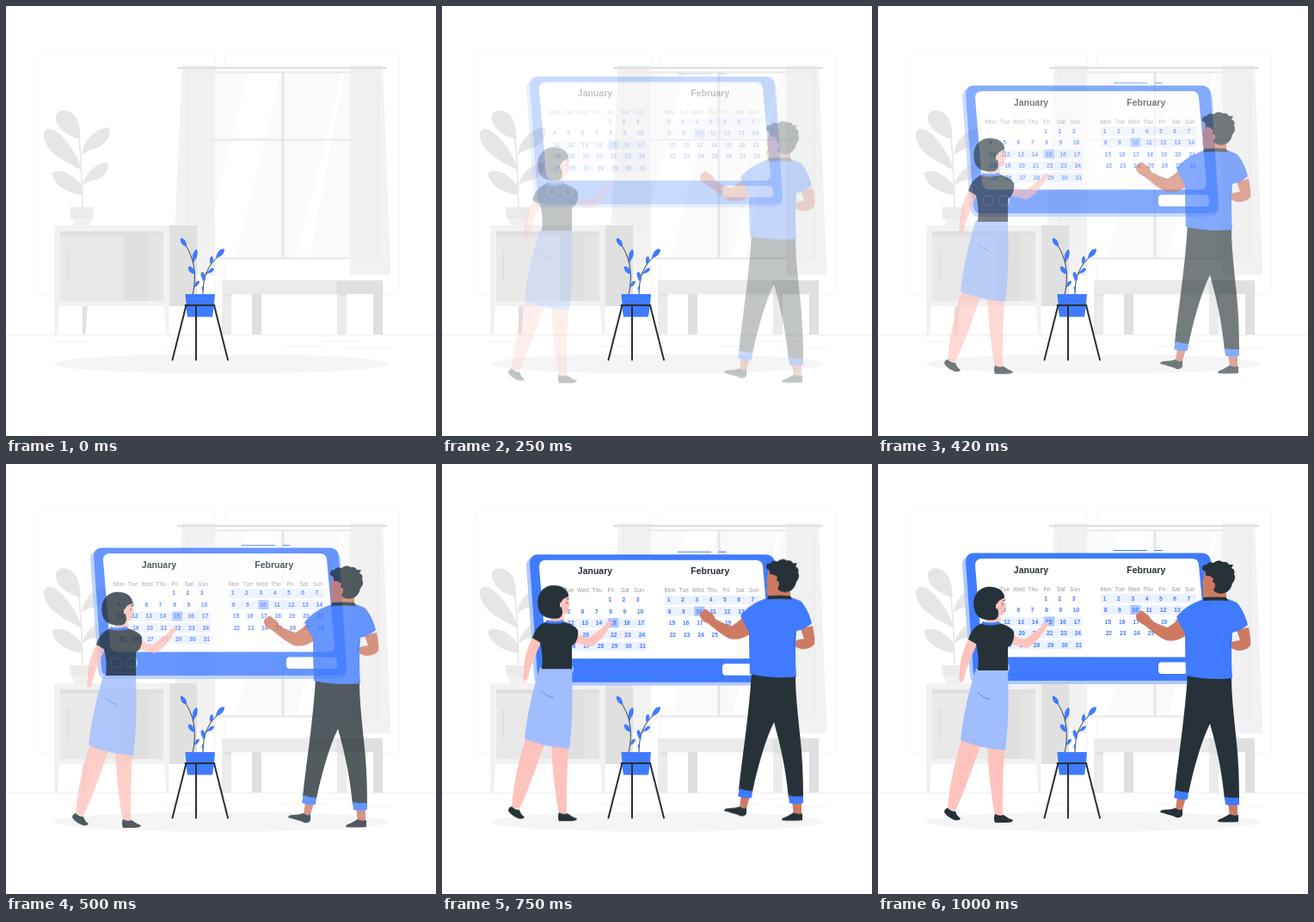
Write an HTML page that moves like this. It is 500x500 px and loops after 1040 ms.

```html
<!DOCTYPE html>
<html lang="en">
<head>
<meta charset="utf-8">
<title>Calendar planning</title>
<style>
  html, body { margin: 0; width: 100%; height: 100%; overflow: hidden; background: #fff; }
  svg { display: block; width: 100vw; height: 100vh; }
  text { font-family: "Liberation Sans", Arial, sans-serif; }
  .slide {
    animation: slide 1s cubic-bezier(.36, -.01, .5, 1.38) both paused;
    animation-delay: calc(var(--t, 0) * -1ms);
  }
  .down { --from: -30px; }
  .up { --from: 30px; }
  @keyframes slide {
    from { opacity: 0; transform: translateY(var(--from)); }
    to { opacity: 1; transform: none; }
  }
  .title { font-size: 10.5px; font-weight: bold; fill: #263238; text-anchor: middle; }
  .name { font-size: 6.7px; fill: #999; text-anchor: middle; }
  .day { font-size: 6.7px; font-weight: bold; fill: #407bff; }
  .ink { fill: #263238; }
  .blue { fill: #407bff; }
  .pink { fill: #ffc3bd; }
  .tan { fill: #ce7a63; }
  .line { fill: none; stroke: #263238; stroke-linecap: round; }
</style>
</head>
<body>
<svg viewBox="0 0 500 500">
  <g id="room">
    <g fill="none" stroke="#f7f7f7">
      <rect x="39" y="55.500" width="204" height="281" rx="3"/>
      <rect x="254.500" y="55.500" width="203" height="281" rx="3"/>
    </g>
    <path d="M0 382.500H500" stroke="#f0f0f0"/>
    <path d="M52 390.500H97M183 395.500H215M320 395.500H372M366 389.500H415M390 398.500H448" stroke="#f5f5f5"/>
    <ellipse cx="250" cy="416" rx="194" ry="11.500" fill="#f5f5f5"/>

    <!-- window -->
    <rect x="210" y="76" width="224" height="219" fill="#fafafa"/>
    <path d="M281 78H320L267 293H228ZM391 78H394L353 293H337Z" fill="#fff"/>
    <path d="M211 77H433V293.500H211Z" fill="none" stroke="#ebebeb" stroke-width="2.500"/>
    <path d="M211 155.500H433" stroke="#ebebeb" stroke-width="2.500"/>
    <path d="M322 77V293" stroke="#e6e6e6" stroke-width="3"/>
    <path d="M433 77V293" stroke="#e3e3e3" stroke-width="2"/>
    <g fill="#efefef" fill-opacity=".8">
      <path d="M205 69H243V313H194Z"/>
      <path d="M400 69H438L447.500 313H400Z"/>
    </g>
    <path d="M200 72H442" stroke="#e0e0e0" stroke-width="2.400" stroke-linecap="round"/>

    <!-- cabinet -->
    <path d="M89 348H95L92.500 382H89Z" fill="#e0e0e0"/>
    <path d="M56.500 348H62L60 382H56.500ZM184 348H189.500V382H186.500Z" fill="#f0f0f0"/>
    <rect x="189" y="255" width="33" height="94" fill="#e0e0e0"/>
    <rect x="56" y="255" width="134" height="94" fill="#f2f2f2"/>
    <rect x="63" y="262" width="120" height="81" fill="#e0e0e0"/>
    <rect x="63" y="267" width="74" height="76" fill="#e9e9e9"/>
    <rect x="166" y="267" width="17" height="76" fill="#e5e5e5"/>
    <path d="M71.500 285V319" stroke="#dedede" stroke-width="2" stroke-linecap="round"/>

    <!-- bench -->
    <path d="M251 335H262V382H251ZM385 335H396V382H385Z" fill="#ebebeb"/>
    <path d="M286 335H297V382H286ZM427 335H438V382H427ZM251 335H262V339ZM385 335H396V339Z" fill="#e0e0e0"/>
    <rect x="251" y="319" width="134" height="16" fill="#ebebeb"/>
    <rect x="384.500" y="319" width="53.500" height="16" fill="#e0e0e0"/>

    <!-- grey plant -->
    <g fill="#e6e6e6">
      <path d="M87 155C75 153 56 142 58 127C62 117 78 121 83 133C86 140 86 148 87 155Z"/>
      <path d="M88 191C72 182 42 170 44 147C50 135 66 151 74 162C81 172 86 181 88 191Z"/>
      <path d="M88 220C73 218 53 208 54 194C63 187 80 197 88 209Z"/>
      <path d="M88 173C89 160 100 144 118 141C125 146 118 160 106 165Q94 168 88 173Z"/>
      <path d="M89 209C91 196 104 183 117 182C122 187 116 198 105 202Q95 203 89 209Z"/>
    </g>
    <path d="M89 235C88 200 88 175 84 147" fill="none" stroke="#e6e6e6" stroke-width="1.600"/>
    <path d="M74 234H102L101 246H75Z" fill="#ebebeb"/>
    <path d="M77 246H100L98 255H79Z" fill="#f0f0f0"/>
    <path d="M75 246H101" stroke="#e6e6e6"/>
  </g>

  <g id="pot">
    <path class="line" d="M217 336C223 309 217 290 208 277M229 336C229 313 235 301 249 289M219 311L213 305M218 298L220 291M229 319L229 312M232 312L240 306M238 299L239 294" stroke-width=".9"/>
    <g class="blue">
      <path d="M210 280C205 279 202 274 203 270C207 269 211 275 210 280Z"/>
      <path d="M217 297C216 290 218 284 222 283C224 288 222 295 217 297Z"/>
      <path d="M220 312C214 311 211 307 212 303C216 302 220 307 220 312Z"/>
      <path d="M219 327C219 322 222 319 225 320C225 323 222 326 219 327Z"/>
      <path d="M231 320C227 317 225 311 228 309C231 310 233 316 231 320Z"/>
      <path d="M234 311C235 307 239 304 242 305C242 308 238 311 234 311Z"/>
      <path d="M238 300C236 296 237 291 240 291C242 294 241 298 238 300Z"/>
      <path d="M244 293C245 286 250 281 254 283C254 288 250 292 244 293Z"/>
      <path d="M229 332C227 329 227 326 229 326C230 328 230 330 229 332Z"/>
      <path d="M208.500 335H243L242 347H209.500ZM209 348H242L240 361.500H211Z"/>
    </g>
    <path class="line" d="M208.500 348H242.500M209.500 348L193.500 411.500M221 348V411.500M242 348L258 411.500" stroke-width="2"/>
  </g>

  <g id="calendar" class="slide down">
    <path d="M274 100.500H313M321.500 100.500H330.500" stroke="#407bff"/>
    <path d="M107 107H378Q388 108 389 117L396 246Q396 255 387 256H115Q108 255 107 246L98 116Q98 108 107 107Z" fill="#b0c9ff"/>
    <path class="blue" d="M111 103.500H377Q386 104 387 113L396 243Q396 252 387 252H119Q112 252 111 244L102 113Q102 104 111 103.500Z"/>
    <path d="M121 110H365Q372 110 373 117L382 217Q382 224.500 375 224.500H130Q122 224.500 121 216L113 118Q113 110 121 110Z" fill="#fff"/>
    <path d="M330 230.500H380Q384 230.500 384.500 234L385 240Q385 244 381 244H330Q326 244 326 240V234Q326 230.500 330 230.500Z" fill="#fff"/>
    <g fill="none" stroke="#e3ecff">
      <circle cx="128.500" cy="237" r="6"/>
      <circle cx="146.500" cy="237" r="6"/>
    </g>
    <g id="dates"></g>
  </g>

  <g id="woman" class="slide up">
    <path class="pink" d="M106 203L115 210C109 222 104 235 101 245Q100 253 96 254Q93 251 95 244C95 229 99 214 106 203Z"/>
    <path class="pink" d="M99 316L121 322C112 348 101 379 90 403L81 401C83 372 90 342 99 316Z"/>
    <path class="pink" d="M127 326H147C146 354 144 382 145 410H136C131 382 128 354 127 326Z"/>
    <path class="ink" d="M81 400Q85 404 90 404Q92 410 96 412Q95 415 89 414Q81 411 77 405Q77 401 81 400Z"/>
    <path class="ink" d="M136 407Q141 410 146 408Q151 412 157 414Q157 417 149 417H136Q134 412 136 407Z"/>
    <path d="M114 238L151 239C152 272 152 303 148 333C130 331 112 328 96 321C99 292 106 263 114 238Z" fill="#a0bdff"/>
    <path d="M115 265Q122 272 130 274" fill="none" stroke="#407bff" stroke-width=".7"/>
    <path class="pink" d="M128 170H142L141 187H126Z"/>
    <path class="pink" d="M136 150C146 151 147 158 149 166L147 168Q148 175 143 176Q136 176 133 169Z"/>
    <path d="M145 159L148 158M145 162V164" class="line" stroke-width=".8"/>
    <path d="M144 171L147 171" stroke="#e89087" stroke-width=".8"/>
    <path class="ink" d="M112 169C108 151 120 141 133 143C144 144 148 152 147 156C140 158 137 162 139 168C141 175 140 179 136 181C126 183 114 180 112 169Z"/>
    <path class="pink" d="M137 163Q141 161 141 166Q140 169 137 168Z"/>
    <path class="pink" d="M151 202L158 199Q165 204 172 203L190 189Q191 184 195 185L198 183Q199 187 195 191C189 201 181 211 173 214Q162 211 152 209Z"/>
    <path class="ink" d="M122 185Q131 188 141 185C149 187 155 190 158 195Q159 203 155 210L151 213V240H116Q118 225 114 209L105 204C108 194 114 187 122 185Z"/>
    <path class="blue" d="M122 183Q131 186 141 183L142 186Q131 189 120 186Z"/>
  </g>

  <g id="man" class="slide up">
    <path class="tan" d="M417 193L431 190Q434 205 433 211Q429 217 418 217L410 214Q409 207 414 206L421 205Z"/>
    <path class="tan" d="M348 386L358 388L354 402H346ZM407 393H418V410H409Z"/>
    <path class="ink" d="M346 400Q351 404 354 401V408Q352 412 347 411C341 408 334 407 328 405Q328 402 334 402Q341 402 346 400Z"/>
    <path class="ink" d="M409 407Q414 410 419 408V416Q407 417 395 416Q395 413 400 412Z"/>
    <path class="ink" d="M360 244L411 247C411 270 414 294 416 315C419 341 420 364 420 390H403C400 358 394 330 386 302C376 322 367 354 361 383L345 381C349 342 357 294 360 244Z"/>
    <path class="blue" d="M346 379Q353 382 361 382L360 390Q351 391 344 388ZM403 387Q411 389 420 388V396Q412 398 404 396Z"/>
    <path class="tan" d="M380 125H393V145L405 150V162H379V154Q376 149 379 143L377 140Z"/>
    <path class="tan" d="M358 172L365 195C353 204 344 207 335 205C324 200 316 192 309 187Q301 184 300 178Q299 175 303 173Q306 168 310 173Q316 176 318 182Q329 188 337 190Q348 183 358 172Z"/>
    <path class="ink" d="M377 123Q376 117 382 117Q384 113 390 115Q396 110 401 114Q406 113 408 117L413 117L411 121Q416 123 414 128Q417 133 412 139Q410 148 403 150Q396 152 391 148L388 142L390 133Q385 129 381 130Q382 124 377 123Z"/>
    <path class="tan" d="M386 139Q390 135 392 140Q392 146 388 147Q385 145 386 139Z"/>
    <path class="blue" d="M380 157Q394 160 407 157L417 161C424 168 428 179 430 187Q422 194 412 196Q410 222 412 249Q386 252 358 246Q357 221 357 197Q350 185 347 178C356 167 366 161 380 157Z"/>
    <path class="ink" d="M379 155Q393 154 405 155L407 159Q393 158 378 159Z"/>
    <path d="M411 197L409 213M404 281L408 298" fill="none" stroke="#263238" stroke-opacity=".35" stroke-width=".7"/>
  </g>
</svg>
<script>
  const dates = document.getElementById('dates');
  const add = (tag, attrs, text = '') => {
    const el = document.createElementNS('http://www.w3.org/2000/svg', tag);
    for (const key in attrs) el.setAttribute(key, attrs[key]);
    el.textContent = text;
    dates.append(el);
  };
  const pitch = 16.3, rowGap = 13.5;

  function drawMonth({ title, x, first, days, bands, picked }) {
    for (const row of bands) {
      add('rect', { x: x - 2.500 + row * .4, y: 151 + row * rowGap, width: 111, height: 10.5, fill: '#ebf1ff' });
    }
    add('text', { class: 'title', x: x + 50, y: 126.6 }, title);
    'Mon Tue Wed Thu Fri Sat Sun'.split(' ').forEach((name, col) =>
      add('text', { class: 'name', x: x + 3.2 + col * pitch, y: 147.6 }, name));
    for (let day = 1; day <= days; day++) {
      const cell = day - 1 + first, row = Math.floor(cell / 7);
      const left = x + (cell % 7) * pitch + row * .95, y = 158.5 + row * rowGap;
      if (day === picked) add('rect', { x: left - 2, y: y - 8, width: 12, height: 11, fill: '#abc5ff' });
      add('text', { class: 'day', x: left, y }, day);
    }
  }
  drawMonth({ title: 'January', x: 128, first: 4, days: 31, bands: [2, 3, 4], picked: 15 });
  drawMonth({ title: 'February', x: 261.8, first: 0, days: 28, bands: [0, 1], picked: 10 });

  // Slide time advances in held steps, 24 per second.
  const loop = 1040, fps = 24, start = performance.now();
  function tick() {
    const t = (performance.now() - start) % loop;
    const step = Math.min(24, Math.floor((t + 5) * fps / 1000));
    document.documentElement.style.setProperty('--t', step < 2 ? 0 : Math.min(1000, step * 1000 / fps + 30));
    requestAnimationFrame(tick);
  }
  tick();
</script>
</body>
</html>
```
